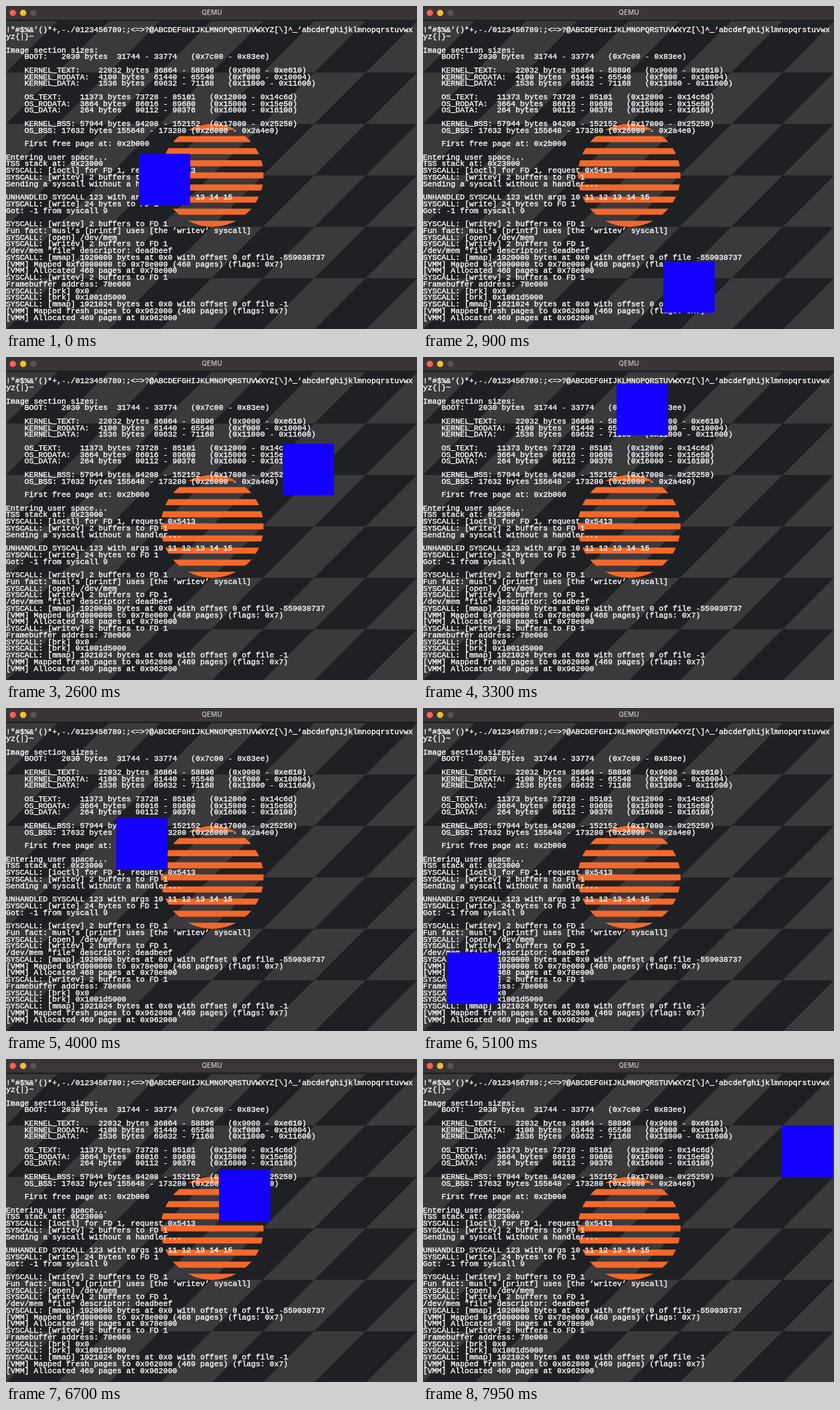
Write an HTML page with a canvas that moves like this. It is 600 by 471 pixels and loops after 8000 ms.

```html
<!DOCTYPE html>
<html lang="en">
<head>
<meta charset="utf-8">
<title>QEMU</title>
<style>
  html, body { margin: 0; width: 100%; height: 100%; overflow: hidden; background: #1f2023; }
  canvas { display: block; width: 600px; height: 471px; }
</style>
</head>
<body>
<canvas id="stage" width="600" height="471"></canvas>
<script>
const W = 600, H = 471, TOP = 22, SCREEN_H = 450, LOOP = 8000, STEP = 50;
const CELL = 75, BOX = 75, SUN_R = 75, SUN_BANDS = 9;
const DARK = '#1f2023', LIGHT = '#3a3a3d', ORANGE = '#f4682a', BLUE = '#1400ff';
const CHAR_W = 6.75, LINE_H = 9.75, FIRST_BASELINE = 38.3;

const ascii = Array.from({ length: 94 }, (_, i) => String.fromCharCode(33 + i)).join('');

const log = `${ascii.slice(0, 88)}
${ascii.slice(88)}

Image section sizes:
\tBOOT:\t2030 bytes\t31744 - 33774\t(0x7c00 - 0x83ee)

\tKERNEL_TEXT:\t22032 bytes\t36864 - 58896\t(0x9000 - 0xe610)
\tKERNEL_RODATA:\t4100 bytes\t61440 - 65540\t(0xf000 - 0x10004)
\tKERNEL_DATA:\t1536 bytes\t69632 - 71168\t(0x11000 - 0x11600)

\tOS_TEXT:\t11373 bytes\t73728 - 85101\t(0x12000 - 0x14c6d)
\tOS_RODATA:\t3664 bytes\t86016 - 89680\t(0x15000 - 0x15e50)
\tOS_DATA:\t264 bytes\t90112 - 90376\t(0x16000 - 0x16108)

\tKERNEL_BSS:\t57944 bytes\t94208 - 152152\t(0x17000 - 0x25258)
\tOS_BSS:\t17632 bytes\t155648 - 173280\t(0x26000 - 0x2a4e0)

\tFirst free page at: 0x2b000

Entering user space...
TSS stack at: 0x23000
SYSCALL: [ioctl] for FD 1, request 0x5413
SYSCALL: [writev] 2 buffers to FD 1
Sending a syscall without a handler...

UNHANDLED SYSCALL 123 with args 10 11 12 13 14 15
SYSCALL: [write] 24 bytes to FD 1
Got: -1 from syscall 9

SYSCALL: [writev] 2 buffers to FD 1
Fun fact: musl's [printf] uses [the 'writev' syscall]
SYSCALL: [open] /dev/mem
SYSCALL: [writev] 2 buffers to FD 1
/dev/mem "file" descriptor: deadbeef
SYSCALL: [mmap] 1920000 bytes at 0x0 with offset 0 of file -559038737
[VMM] Mapped 0xfd000000 to 0x78e000 (468 pages) (flags: 0x7)
[VMM] Allocated 468 pages at 0x78e000
SYSCALL: [writev] 2 buffers to FD 1
Framebuffer address: 78e000
SYSCALL: [brk] 0x0
SYSCALL: [brk] 0x1001d5000
SYSCALL: [mmap] 1921024 bytes at 0x0 with offset 0 of file -1
[VMM] Mapped fresh pages to 0x962000 (469 pages) (flags: 0x7)
[VMM] Allocated 469 pages at 0x962000`;

// Time in ms and distance travelled along each axis; the speed wavers slightly.
const travel = [
  [0, 0], [1800, 313.5], [2600, 452], [4000, 695],
  [5100, 891], [6700, 1167], [7950, 1382.5], [8000, 1391]
];

function drawTiles(g) {
  g.fillStyle = DARK;
  g.fillRect(0, 0, W, H);
  g.fillStyle = LIGHT;
  for (let row = 0; row < 6; row++) {
    const y = TOP + row * CELL;
    for (let col = row % 2 ? -1 : 0; col < 16; col += 2) {
      const x = (col - row) * CELL;
      g.beginPath();
      g.moveTo(x, y);
      g.lineTo(x + CELL, y);
      g.lineTo(x, y + CELL);
      g.lineTo(x - CELL, y + CELL);
      g.fill();
    }
  }
}

function drawSun(g) {
  const cx = 301, cy = TOP + SCREEN_H / 2;
  const band = 2 * SUN_R / (2 * SUN_BANDS - 1);
  g.save();
  g.beginPath();
  g.arc(cx, cy, SUN_R, 0, Math.PI * 2);
  g.clip();
  g.fillStyle = ORANGE;
  for (let i = 0; i < SUN_BANDS; i++) {
    g.fillRect(cx - SUN_R, cy - SUN_R + 2 * i * band, 2 * SUN_R, band);
  }
  g.restore();
}

function drawLog(g) {
  g.font = '11.25px "Liberation Mono", monospace';
  g.textAlign = 'left';
  g.textBaseline = 'alphabetic';
  g.fillStyle = g.strokeStyle = '#fff';
  g.lineWidth = 0.35;
  log.split('\n').forEach((line, row) => {
    const y = FIRST_BASELINE + row * LINE_H;
    let col = 0;
    for (const raw of line) {
      if (raw === '\t') {
        col += 4 - col % 4;
        continue;
      }
      const ch = raw === "'" ? '’' : raw === '`' ? '‘' : raw;
      g.fillText(ch, col * CHAR_W, y);
      g.strokeText(ch, col * CHAR_W, y);
      col++;
    }
  });
}

function drawTitleBar(g) {
  g.fillStyle = '#393537';
  g.fillRect(0, 0, W, TOP - 1);
  g.fillStyle = '#1b1b1d';
  g.fillRect(0, TOP - 2, W, 1);
  ['#ff5f57', '#febc2e', '#565355'].forEach((color, i) => {
    g.fillStyle = color;
    g.beginPath();
    g.arc(10 + i * 15, 10, 4.6, 0, Math.PI * 2);
    g.fill();
  });
  g.fillStyle = '#b8b6b8';
  g.font = '600 9.75px Inter, sans-serif';
  g.textAlign = 'center';
  g.textBaseline = 'middle';
  g.fillText('QEMU', 300.5, 10.5);
}

function makeBackdrop() {
  const layer = document.createElement('canvas');
  layer.width = W;
  layer.height = H;
  const g = layer.getContext('2d');
  drawTiles(g);
  drawSun(g);
  drawLog(g);
  drawTitleBar(g);
  return layer;
}

function distanceAt(t) {
  const i = travel.findIndex(([time]) => time > t);
  const [t0, d0] = travel[i - 1], [t1, d1] = travel[i];
  return d0 + (d1 - d0) * (t - t0) / (t1 - t0);
}

// Reflects a growing coordinate back and forth within 0..size.
function bounce(v, size) {
  const r = v % (2 * size);
  return r > size ? 2 * size - r : r;
}

const ctx = document.getElementById('stage').getContext('2d');
const backdrop = makeBackdrop();
const start = performance.now();

function frame() {
  const t = Math.floor((performance.now() - start) % LOOP / STEP) * STEP;
  const d = distanceAt(t);
  const x = bounce(194 + d, W - BOX);
  const y = TOP + bounce(193.5 + d, SCREEN_H - BOX);
  ctx.drawImage(backdrop, 0, 0);
  ctx.fillStyle = BLUE;
  ctx.fillRect(x, y, BOX, BOX);
  requestAnimationFrame(frame);
}
frame();
</script>
</body>
</html>
```
